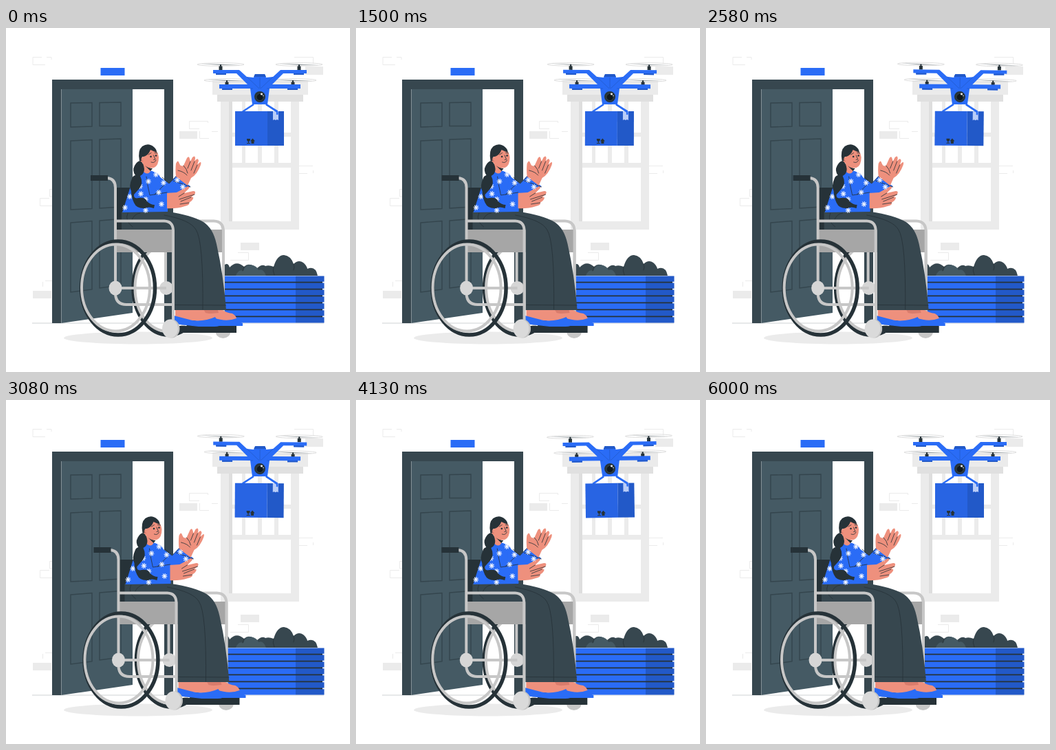
These frames come from a looping animation (500 px wide and 500 px high, 6.04 s). An HTML page:

```html
<!DOCTYPE html>
<html lang="en">
<head>
<meta charset="utf-8">
<title>Drone delivery</title>
<style>
html, body { margin: 0; width: 100%; height: 100%; overflow: hidden; background: #fff; }
svg { display: block; width: 100%; height: 100%; }
.blue { fill: #2a6cf6; } .deep { fill: #2259c8; }
.dark { fill: #263238; } .slate { fill: #37474f; }
.pale { fill: #ebebeb; } .skin { fill: #ee907d; } .white { fill: #fff; }
.outline { fill: none; stroke: #ebebeb; stroke-width: 1; }
.tube { fill: none; stroke: #c7c7c7; stroke-width: 4; }
.fine { fill: none; stroke: #263238; stroke-width: .8; stroke-linecap: round; stroke-linejoin: round; }
</style>
</head>
<body>
<svg viewBox="0 0 500 500">
  <g id="wall">
    <path class="outline" d="M52 42.5H39V53.5H57M59 42.5H66V46M266.500 147V135.500H293.500V138M266.500 146.500H281M308 150.500H299M281.500 150V160.500H295M67 367.500H57M53.500 369V376M67 234.500H63.500V245H67M63 247.500H49.500V258.500H67M326 337.500H352.500V326.500H337M426 200.500H446M426 211.500H438M446.500 207V211M419 42.500H446.500V52"/>
    <path class="pale" d="M252 150h26v11h-26zM39 382h27v11H39zM341 312h27v11h-27zM435 56h26v12h-26z"/>
    <path class="pale" d="M312 106H426V293H312z"/>
    <path class="white" d="M329 107H414V196H329zM329 203H414V281H329z"/>
    <path fill="#dedede" d="M324 107h5V281h-5z"/>
    <path class="pale" d="M343 107h5v90h-5zM366 107h6v90h-6zM390 107h6v90h-6zM329 152h85v6h-85zM300 76H439V97H300z"/>
    <path fill="#e0e0e0" d="M307 97H432V107H307z"/>
    <ellipse class="pale" cx="192" cy="450.500" rx="108" ry="9"/>
    <path stroke="#b8bec1" stroke-width=".7" d="M38 429H462"/>
  </g>

  <g id="door">
    <path class="blue" d="M137.500 58h35v11h-35z"/>
    <path class="slate" d="M67 75H243V429H230V89H80V429H67z"/>
    <path fill="#455a64" d="M80.500 89H184V414L80.500 429z"/>
    <path fill="none" stroke="#78868d" stroke-width=".7" d="M80.500 89V429"/>
    <path fill="none" stroke="#34454d" stroke-width="1.400" d="M94 109L125 108.500V143L94 144zM136 108.500L167 108V142.500H136zM94 164L125 162.500V262.500L94 264zM136 162L167 161V260L136 262zM94 283L125 280.500V380L94 384zM136 280L167 277.500V374L136 378z"/>
  </g>

  <g id="planter">
    <path class="slate" d="M318 360V344Q323 341 325 348Q335 337 346 347Q354 339 364 350Q372 342 377 346Q382 344 389 347Q394 330 404 330Q414 331 418 343Q425 336 432 341Q437 345 438 350Q450 345 453 360z"/>
    <path fill="#455a64" d="M334 360Q338 350 345 353Q348 344 356 344Q365 346 367 352Q374 349 378 360z"/>
    <path class="fine" d="M346 347L344 353M389 347Q387 353 390 359M418 343Q420 348 418 352"/>
    <path class="dark" d="M318 361H460V428H318z"/>
    <g id="planks"></g>
  </g>

  <g id="rider">
    <g id="farSide">
      <ellipse cx="236" cy="378" rx="51" ry="68" fill="none" stroke="#263238" stroke-width="5.500"/>
      <ellipse cx="234" cy="378" rx="46.500" ry="62.500" class="tube"/>
      <path class="tube" d="M232 268V378M236 280.500H302Q316 281 316 296V438"/>
      <path fill="#a6a6a6" d="M160 293H316V326H160z"/>
      <circle cx="233" cy="378" r="10" fill="#d6d6d6"/>
      <ellipse cx="315.500" cy="441" rx="11" ry="10" fill="#c7c7c7"/>
      <path class="tube" d="M316 293V420"/>
      <path class="dark" d="M160 232H181V293H160zM243 433H335V443H250z"/>
    </g>

    <g id="woman">
      <path class="skin" d="M287 407H309Q320 414 329 415Q336 419 335 424L306 427z"/>
      <path fill="#d97c6c" d="M286 407H307L309 414L288 416z"/>
      <path class="skin" d="M246 407H286L290 414Q303 416 305 422Q289 428 270 425L246 420z"/>
      <path class="blue" d="M302 421Q320 428 335 422Q340 428 344 429V433H302z"/>
      <path class="blue" d="M244 418Q259 422 271 425Q289 427 304 420Q308 428 313 430Q312 434 303 434H280L244 430z"/>
      <path class="slate" d="M168 267H235Q270 272 287 282Q301 291 306 314Q316 358 320 410H245V293H168z"/>
      <path class="fine" d="M230 272Q268 279 276 293Q287 309 286 409M246 402.500L319.500 403M177 269Q172 280 184 289M195 269Q185 270 182 282"/>

      <path class="blue" d="M199 207Q187 210 183 224L169 268L235 267L236 237L222 213Q210 205 199 207z"/>
      <path class="blue" d="M220 214L237 226L247 215L268 230L259 239L235 244L219 235z"/>
      <path class="skin" d="M247 216Q246 205 247 197Q250 190 252 197Q254 202 258 200L263 189Q266 185 267 190L268 194L271 188Q275 184 275 190L274 194Q279 187 280 193L278 199Q285 191 283 199Q278 213 269 218L264 229z"/>
      <path class="fine" d="M258 200Q263 205 264 211M268 194L264 204M274 194L269 207M278 199L273 211M250 207Q259 209 263 214"/>
      <path class="skin" d="M233 240L248 239L259 233Q268 227 266 233L259 240L272 237Q277 237 274 242L269 246Q275 245 270 251L266 254Q268 257 260 259Q248 263 232 262z"/>
      <path class="fine" d="M259 240L251 245M274 242L252 249M269 246L254 252M266 254L253 256"/>
      <path class="blue" d="M205 218Q198 233 207 244L234 239V264L203 267Q196 263 195 251z"/>
      <path class="fine" d="M204 216Q206 231 209 243L234 239M227 217L237 226L247 216M216 242L231 227M243 222L268 231"/>
      <g id="flowers" fill="none" stroke="#f4f7ff" stroke-width="1.200" stroke-linecap="round"></g>

      <path class="skin" d="M199 193V208Q206 215 210 208V200z"/>
      <path d="M202 200Q207 204 213 204L210 208z" class="dark"/>
      <path class="skin" d="M198 180Q203 172 216 176Q221 180 222 188Q222 200 215 203Q206 205 201 197Q194 196 194 190Q195 186 199 188z"/>
      <path class="dark" d="M194 193Q191 178 198 172Q207 166 215 173Q219 176 219 181Q214 179 210 177Q207 185 200 187Q196 186 197 193z"/>
      <path class="dark" d="M195 193Q200 196 201 205Q201 212 195 215Q200 225 194 233L186 242Q185 249 193 247Q203 246 205 252Q210 257 216 257L215 262Q207 259 202 262Q190 263 186 254Q182 245 182 237Q178 230 183 219Q184 215 188 214Q183 207 187 200Q190 194 195 193z"/>
      <circle cx="210.500" cy="187" r="1.300" class="dark"/>
      <circle cx="218" cy="185.500" r="1.300" class="dark"/>
      <path class="fine" stroke-width="1" d="M207 184L211 181.500M216 181.500L220 182M214.500 185L217 191L214.500 191.500M211 195Q216 197 218 192"/>
      <path fill="none" stroke="#c76a5e" stroke-width=".8" d="M196 190L199 194"/>
    </g>

    <g id="nearSide">
      <path fill="#a6a6a6" d="M160 293H243V326H160z"/>
      <path class="tube" d="M147 218Q159 219 159 232V387Q160 402 175 402H243M159 280.500H230Q243 281 243 295V427"/>
      <path class="tube" d="M159 378H233" stroke-width="3"/>
      <path class="dark" d="M123 214H148V222H123z"/>
      <ellipse cx="163" cy="378" rx="53.500" ry="68" fill="none" stroke="#263238" stroke-width="5.500"/>
      <ellipse cx="159.500" cy="377.500" rx="49.500" ry="63" class="tube"/>
      <ellipse cx="159" cy="378" rx="9.500" ry="10.500" fill="#d6d6d6"/>
      <ellipse cx="241" cy="437" rx="11.500" ry="13.500" fill="#c2c2c2"/>
      <ellipse cx="238.500" cy="437" rx="11.500" ry="13.500" fill="#dadada"/>
    </g>
  </g>

  <g id="drone">
    <g id="rotors"></g>
    <path fill="none" stroke="#2a6cf6" stroke-width="2.500" d="M360 111L344 121.500M378 111L394 121V125"/>
    <path fill="#2864e3" d="M333 121H380V171H333z"/>
    <path class="deep" d="M380 121H404V171H380z"/>
    <path fill="#b9cdf8" d="M388 121h8v13l-2-1-2 1-2-1-2 1z"/>
    <path fill="none" stroke="#2a6cf6" stroke-width="2.500" d="M378 111L393 121Q395 122 394 126"/>
    <path class="dark" d="M350 161h5q0 4-2 4v2h2v1h-5v-1h2v-2q-2 0-2-4zM358.500 160.500l3.500 4h-1.500v3.500h-4v-3.500h-1.500z"/>
    <path class="blue" d="M301 61H339L350 71L360 72L362 67H376L378 72L388 71L399 61H437V66H433V68H418V66H403L387 82H428V88H424V90H409V88H383L380 111H358L355 88H329V90H314V88H310V82H351L335 66H320V68H305V66H301z"/>
    <path class="deep" d="M305 66h15v2h-15zM418 66h15v2h-15zM314 88h15v2h-15zM409 88h15v2h-15zM360 71L362 67H376L378 71z"/>
    <path fill="none" stroke="#2259c8" stroke-width=".7" d="M350 71L368 88M388 71L370 88M355 88H359M379 88H383M369 72V88"/>
    <circle cx="369" cy="100" r="8" class="dark"/>
    <circle cx="369" cy="100.500" r="5" fill="#10181c" stroke="#455a64" stroke-width=".6"/>
    <circle cx="371.500" cy="96" r="1.500" class="white"/>
    <circle cx="374" cy="98.500" r=".7" class="white"/>
  </g>
</svg>

<script>
const LOOP = 6040;
const byId = id => document.getElementById(id);

byId('planks').innerHTML = Array.from({ length: 7 }, (_, i) => {
  const y = 360.5 + i * 9.95;
  return `<path class="blue" d="M318 ${y}h103v8.200h-103z"/><path class="deep" d="M421 ${y}h41.500v8.200h-41.500z"/>`;
}).join('');

const flower = ([x, y]) => {
  const rays = [0, 45, 90, 135].map(a =>
    `<path d="M-3.500 0H3.500" transform="rotate(${a + 12})"/>`).join('');
  return `<g transform="translate(${x} ${y})">${rays}</g>`;
};
byId('flowers').innerHTML = [
  [207, 223], [195, 230], [229, 225], [180, 245], [218, 213], [222, 239], [203, 249],
  [226, 256], [203, 265], [173, 261], [249, 221], [257, 231], [196, 241]
].map(flower).join('');

const rotor = ([x, y, reach]) => `
  <ellipse cx="${x}" cy="${y}" rx="${reach}" ry="2.300" fill="#fff" fill-opacity=".5" stroke="#d5d5d5" stroke-width=".8"/>
  <path fill="#8b9397" d="M${x - reach + 5} ${y - 1}L${x} ${y - .2}L${x + reach - 5} ${y + .7}L${x} ${y + .9}z"/>
  <path class="dark" d="M${x - 2.5} ${y + 8}V${y + 2.500}h1.500V${y}h2v2.500h1.500V${y + 8}z"/>`;
byId('rotors').innerHTML = [[312, 53, 34], [426, 53, 34], [321, 76, 33], [417, 76, 34]].map(rotor).join('');

// Smooth curve through [time, value] keys, resting at both ends.
function curve(keys, t) {
  const i = Math.max(0, keys.findIndex(k => k[0] > t) - 1);
  const slope = n => {
    const a = keys[n - 1], b = keys[n + 1];
    return a && b ? (b[1] - a[1]) / (b[0] - a[0]) : 0;
  };
  const [t0, v0] = keys[i], [t1, v1] = keys[i + 1];
  const span = t1 - t0, u = (t - t0) / span, w = 1 - u;
  return v0 * (1 + 2 * u) * w * w + slope(i) * span * u * w * w
       + v1 * (3 - 2 * u) * u * u - slope(i + 1) * span * u * u * w;
}

const ROLL = [[0, 0], [880, 1.1], [2080, 2.2], [3040, 4.5], [4130, 1.3], [5130, .1], [LOOP, 0]];
const TILT = [[0, 0], [1250, 0], [2080, .5], [3080, .35], [4130, -.8], [5130, 0], [LOOP, 0]];

function draw(now) {
  const t = now % LOOP;
  byId('rider').setAttribute('transform', `translate(${curve(ROLL, t).toFixed(3)} 0)`);
  byId('drone').setAttribute('transform', `rotate(${curve(TILT, t).toFixed(3)} 369 98)`);
}

const start = performance.now();
function tick() {
  draw(performance.now() - start);
  requestAnimationFrame(tick);
}
tick();
</script>
</body>
</html>
```
